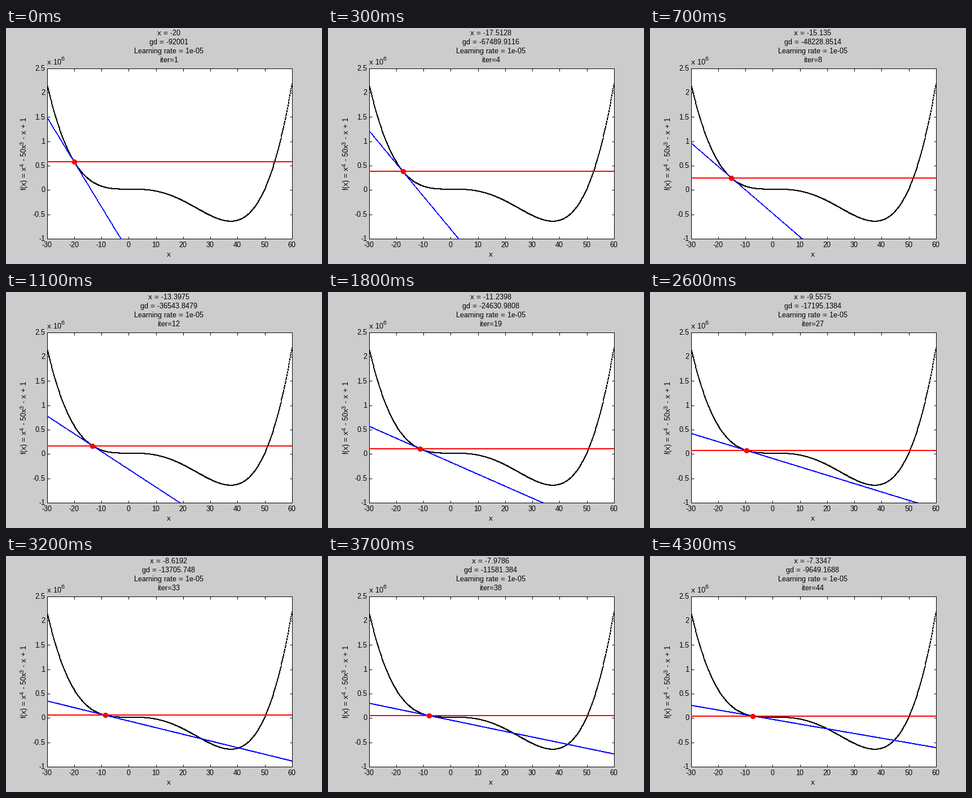
Write a matplotlib script that moves like this. It is 560 px wide and 420 px high and loops after 4400 ms.

```python
import numpy as np
import matplotlib.pyplot as plt
from matplotlib.animation import FuncAnimation

W, H, DPI = 560, 420, 72          # one point is one pixel
LEFT, BOTTOM = 72.8, 373.8
WIDTH, HEIGHT = 434, 303
STEPS, RATE = 44, 1e-5
BLACK, RED, BLUE = (0, 0, 0, 255), (255, 0, 0, 255), (0, 0, 255, 255)

plt.rcParams.update({
    "font.family": "Liberation Sans",
    "text.hinting": "default",
    "text.hinting_factor": 1,
})


def f(x):
    return x**4 - 50 * x**3 - x + 1


def grad(x):
    return 4 * x**3 - 150 * x**2 - 1


def to_px(x):
    return LEFT + (x + 30) / 90 * WIDTH


def to_py(y):
    return BOTTOM - (y / 1e6 + 1) / 3.5 * HEIGHT


def cell(x, y):
    """Column and row of the pixel that holds a data point."""
    col = np.floor(to_px(x) + 0.5).astype(int)
    row = np.floor(to_py(y)).astype(int)
    return col, row


def num(v):
    """Four decimals, trailing zeros dropped."""
    digits = int(np.floor(np.log10(abs(v)))) + 5
    return f"{v:.{digits}g}"


def descend(x):
    path = []
    for _ in range(STEPS):
        path.append(x)
        x -= RATE * grad(x)
    return path


xs = np.linspace(-30, 60, 901)
path = descend(-20.0)

fig = plt.figure(figsize=(W / DPI, H / DPI), dpi=DPI, facecolor="#cccccc")
ax = fig.add_axes([LEFT / W, (H - 1 - BOTTOM) / H, WIDTH / W, HEIGHT / H])
ax.set(xlim=(-30, 60), ylim=(-1, 2.5))
ax.set_xticks(np.arange(-30, 61, 10))
ax.set_yticks(np.arange(-1, 2.6, 0.5))
ax.tick_params(direction="in", top=True, right=True, length=4.5, width=1,
               labelbottom=False, labelleft=False)
for spine in ax.spines.values():
    spine.set_linewidth(1)


def label(x, y, s, size=13, ha="center", rot=0):
    return fig.text(x / W, 1 - y / H, s, fontsize=size, ha=ha, va="baseline",
                    rotation=rot, rotation_mode="anchor")


for v in range(-30, 61, 10):
    label(to_px(v) - 0.5, 390, str(v))
for v in np.arange(-1, 2.6, 0.5):
    label(69.5, to_py(v * 1e6) + 5.2, f"{v:g}", ha="right")
label(288.5, 407, "x")
label(73, 65, "x 10", ha="left")
label(97, 58, "6", 10, "left")

for y, s in ((287.5, "f(x) = x"), (240, " - 50x"), (201, " - x + 1")):
    label(36, y, s, ha="left", rot=90)
for y, s in ((247, "4"), (208, "3")):
    label(32, y, s, 10, "left", 90)

title = [label(288.5, y, "") for y in (13, 29, 45, 61)]


def paint(img, col, row, colour):
    ok = (col >= 73) & (col <= 506) & (row >= 71) & (row <= 374)
    img[row[ok], col[ok]] = colour


def dots(img, y, colour):
    """Samples as 2 by 2 pixel dots."""
    col, row = cell(xs, y)
    for dx in (-1, 0):
        for dy in (-1, 0):
            paint(img, col + dx, row + dy, colour)


def line(img, x0, slope, colour):
    """Straight line through the curve at x0, two pixels wide."""
    col, row = cell(xs, f(x0) + slope * (xs - x0))
    steep = abs(slope) / 3.5e6 * HEIGHT > WIDTH / 90
    paint(img, col, row, colour)
    if steep:
        paint(img, col - 1, row, colour)
    else:
        paint(img, col, row - 1, colour)


def ball(img, x):
    cx, cy = cell(x, f(x))
    rows, cols = np.ogrid[:H, :W]
    img[(cols - cx) ** 2 + (rows - cy) ** 2 <= 4.5**2] = RED


base = np.zeros((H, W, 4), np.uint8)
dots(base, f(xs), BLACK)
layer = fig.figimage(base, 0, 0, origin="upper", zorder=5)


def draw(i):
    x = path[i]
    g = grad(x)
    img = base.copy()
    line(img, x, g, BLUE)
    line(img, x, 0, RED)
    ball(img, x)
    layer.set_data(img)
    lines = (f"x = {num(x)}", f"gd = {num(g)}",
             f"Learning rate = {RATE:g}", f"iter={i + 1}")
    for t, s in zip(title, lines):
        t.set_text(s)
    return [layer, *title]


anim = FuncAnimation(fig, draw, frames=STEPS, interval=100, repeat=True,
                     repeat_delay=0, blit=False)
plt.show()
```
